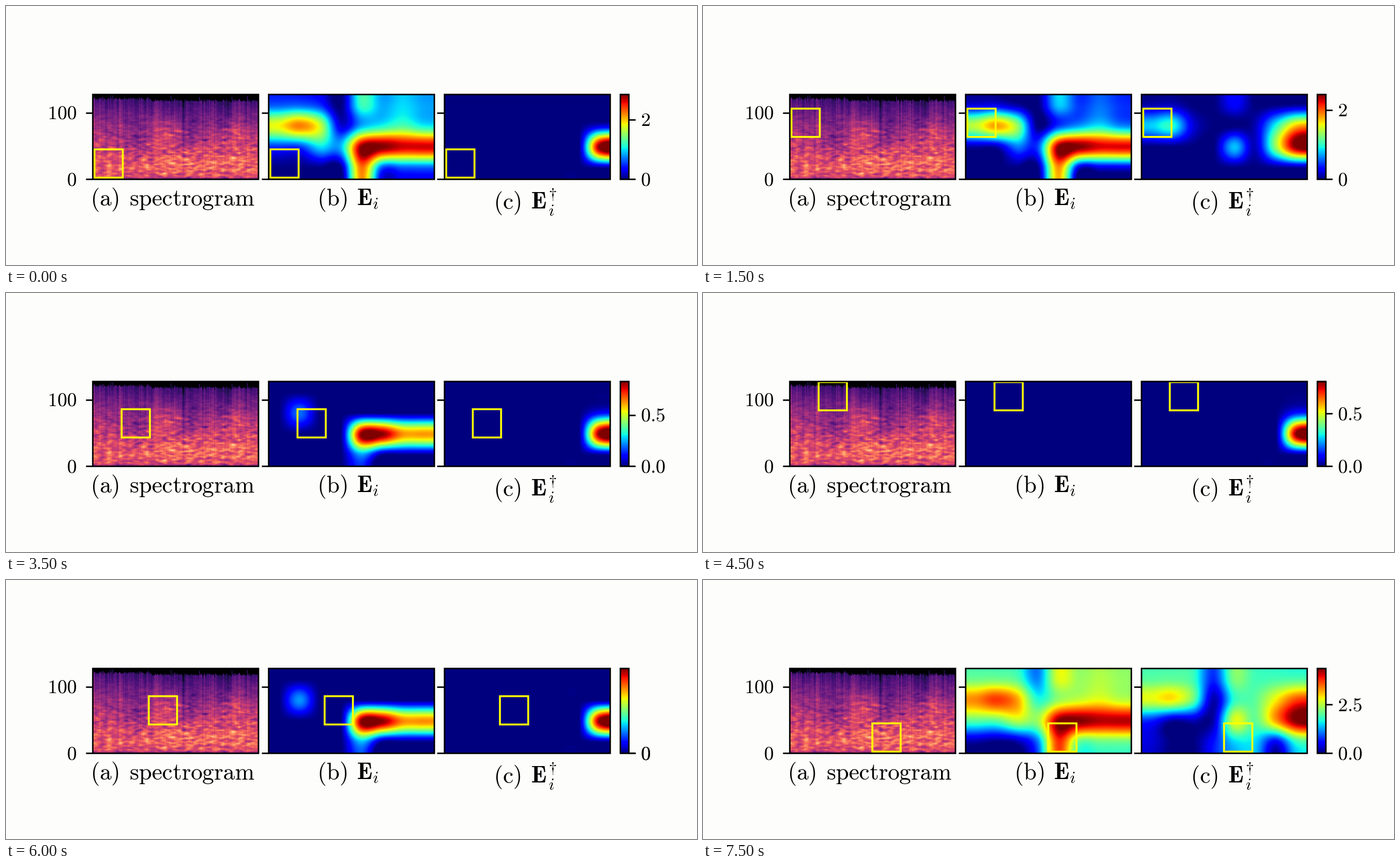
Write a matplotlib script that moves like this. It is 1222 px wide and 458 px high and loops after 8 s.

```python
import numpy as np
import matplotlib.pyplot as plt
from matplotlib.animation import FuncAnimation
from matplotlib.patches import Rectangle

plt.rcParams["mathtext.fontset"] = "cm"

W, H, DPI = 1222, 458, 100
PX = 72 / DPI
TOP, BOTTOM = 156.3, 306
LEFTS, PANEL_W = (153, 464, 774.5), 293
BAR_X, BAR_W = 1086, 14.5
BOX, STEP_X, STEP_Y = 50, 47.8, 24
FRAMES, ROWS = 16, 5
PEAK = 4.36
BIG, SMALL, SCRIPT = 41.4, 34.3, 29


def gauss(x, y, cx, cy, sx, sy):
    return np.exp(-((x - cx) / sx) ** 2 - ((y - cy) / sy) ** 2)


def similarity(base, *spots):
    """Coarse 4x8 map: a level plus (amplitude, col, row, width, height)."""
    row, col = np.mgrid[0:4, 0:8]
    m = base + sum(a * gauss(col, row, *s) for a, *s in spots)
    return np.maximum(m, 0) * PEAK / m.max()


E_MAP = similarity(
    2.0,
    (1.7, 1, 1, 2, 0.6),           # left ridge and its tail
    (0.5, 2, 2, 0.5, 0.5),
    (-1.4, 3, 0.5, 0.7, 0.8),      # gap between the ridges
    (-2.3, 1, 3, 2.2, 0.6),        # empty corner
    (2.5, 4.35, 2, 1, 0.55),       # right ridge
    (2.2, 6.6, 2, 1.4, 0.55),
    (2.0, 4, 3, 0.5, 0.5),         # its foot
    (0.75, 6, 0.7, 1.6, 1),        # haze above it
    (0.7, 4, 0, 0.5, 0.6),
)
D_MAP = similarity(
    1.85,
    (1.35, 0.7, 0.85, 1.4, 0.6),   # left ridge
    (-1.7, 3, 0.8, 0.6, 1.3),      # gap
    (-2.6, 1.3, 2.6, 2.1, 1),      # empty corner
    (1.2, 4, 2, 0.5, 0.5),         # middle spots
    (0.4, 4, 0, 0.5, 0.5),
    (3.05, 7, 1.62, 1.3, 0.85),    # bright right edge
    (-1.5, 6, 3, 0.8, 0.5),
)

# Key points: step, top of the colour bar, peak of the third panel
STEPS, BAR_KEYS, D_KEYS = zip(
    (0, 2.86, 0.76), (1, 3.6, 3), (2, 2.6, 1.6), (3, 2.46, 2.46),
    (5, 2.13, 0.76), (6, 3.3, 1.6), (7, 0.83, 0.8), (9, 0.806, 0.82),
    (11, 1.11, 0), (14, 0.395, 0.82), (15, PEAK, PEAK))


def smooth(a, n, axis):
    k = np.hanning(n + 2)
    out = np.apply_along_axis(np.convolve, axis, a, k, "same")
    return out / out.std()


def spectrogram():
    rng = np.random.default_rng(4)
    f, u = np.mgrid[0:128, 0:250]
    level = np.interp(f, [0, 4, 15, 35, 70, 95, 117],
                      [0.40, 0.60, 0.62, 0.56, 0.45, 0.33, 0.22])
    voiced = (gauss(u, f, 113, 72, 24, 18) + gauss(u, f, 118, 28, 30, 16)
              + gauss(u, f, 212, 62, 26, 22) + gauss(u, f, 185, 25, 40, 18))
    level += 0.10 * voiced + 0.13 * gauss(u, f, 25, 22, 4, 26)
    level -= 0.08 * gauss(u, f, 62, 62, 24, 20)
    level -= 0.07 * gauss(u, f, 148, 72, 14, 26)

    columns = rng.standard_normal(250)
    slow = smooth(rng.standard_normal(250), 9, 0)
    level += (0.02 * columns + 0.02 * slow) * (0.6 + f / 90)
    streaks = smooth(smooth(rng.standard_normal((128, 250)), 13, 1), 4, 0)
    bend = smooth(rng.standard_normal(250), 30, 0)
    lines = np.sin(2 * np.pi * f / 10 + 0.9 * bend)
    level += 0.07 * streaks * np.clip((115 - f) / 70, 0.1, 1)
    level += 0.05 * lines * np.clip(voiced, 0, 1)
    level += 0.02 * rng.standard_normal((128, 250))

    edge = np.where(np.arange(250) < 90, 120.5, 117.5) + 1.2 * columns
    edge += 6 * (rng.random(250) > 0.97)
    level[f > np.minimum(edge, 125)] = 0
    return np.clip(level, 0, 0.93)


fig = plt.figure(figsize=(W / DPI, H / DPI), dpi=DPI, facecolor="#fdfdfc")
ax = fig.add_axes([0, 0, 1, 1])
ax.set_axis_off()


def image(data, x, w, **style):
    return ax.imshow(data, extent=(x, x + w, BOTTOM, TOP), aspect="auto",
                     vmin=0, **style)


def line(x0, x1, y):
    return ax.plot([x0, x1], [y, y], color="black", lw=2.6 * PX,
                   solid_capstyle="butt", zorder=5)[0]


def outline(x, w):
    ax.add_patch(Rectangle((x, TOP), w, BOTTOM - TOP, fill=False,
                           ec="black", lw=2.6 * PX, zorder=6))


def text(x, y, s, size=BIG, ha="left"):
    return ax.text(x, y, f"${s}$", fontsize=size * PX, ha=ha, va="baseline",
                   color="black")


image(spectrogram()[::-1], LEFTS[0], PANEL_W, cmap="magma", vmax=1,
      interpolation="bilinear")
maps = [image(m, x, PANEL_W, cmap="jet", vmax=PEAK, interpolation="catrom")
        for m, x in zip((E_MAP, D_MAP), LEFTS[1:])]
image(np.linspace(1, 0, 256)[:, None], BAR_X, BAR_W, cmap="jet", vmax=1)
outline(BAR_X, BAR_W)

boxes = []
for left in LEFTS:
    outline(left, PANEL_W)
    for value in (0, 100):
        line(left - 12.5, left, BOTTOM - value * (BOTTOM - TOP) / 128)
    box = Rectangle((0, 0), BOX, BOX, fill=False, ec="yellow", lw=3.4 * PX,
                    joinstyle="miter", zorder=4)
    boxes.append(ax.add_patch(box))

text(125, 199.5, "100", SMALL, "right")
text(125, 317, "0", SMALL, "right")
text(149, 353, r"\mathrm{(a)}")
text(217.5, 353, r"\mathrm{spectrogram}")
text(549.5, 353, r"\mathrm{(b)}")
text(620.5, 353, r"\mathbf{E}_i")
text(861.5, 358.5, r"\mathrm{(c)}")
text(927.5, 358.5, r"\mathbf{E}")
text(959, 341, r"\dagger", SCRIPT)
text(959, 371, "i", SCRIPT)

line(BAR_X + BAR_W, BAR_X + BAR_W + 12, BOTTOM)
bar_tick = line(BAR_X + BAR_W, BAR_X + BAR_W + 12, TOP)
bar_zero = text(1122.5, 317, "0", SMALL)
bar_label = text(1122.5, 0, "2", SMALL)

ax.set_xlim(0, W)
ax.set_ylim(H, 0)


def tick_step(top):
    if top >= 3:
        return 2.5
    if top >= 0.85:
        return int(top)
    return 0.5 if top >= 0.5 else 0.2


def draw(i):
    col, row = divmod(i, ROWS)
    for box, left in zip(boxes, LEFTS):
        box.set_xy((left + 3 + col * STEP_X, 253 - row * STEP_Y))

    top = np.interp(i, STEPS, BAR_KEYS)
    silent = col > 0 and row == ROWS - 1
    peaks = 0 if silent else top, np.interp(i, STEPS, D_KEYS)
    for im, base, peak in zip(maps, (E_MAP, D_MAP), peaks):
        im.set_data(np.maximum(base - (PEAK - peak), 0))
        im.set_clim(0, peak or 1)

    step = tick_step(top)
    digits = 0 if isinstance(step, int) else 1
    y = BOTTOM - (BOTTOM - TOP) * step / top
    bar_tick.set_ydata([y, y])
    bar_label.set_y(y + 11)
    bar_label.set_text(f"${step:.{digits}f}$")
    bar_zero.set_text(f"${0:.{digits}f}$")
    return [*boxes, *maps, bar_tick, bar_label, bar_zero]


anim = FuncAnimation(fig, draw, frames=FRAMES, interval=500,
                     repeat=True, repeat_delay=0)
plt.show()
```
